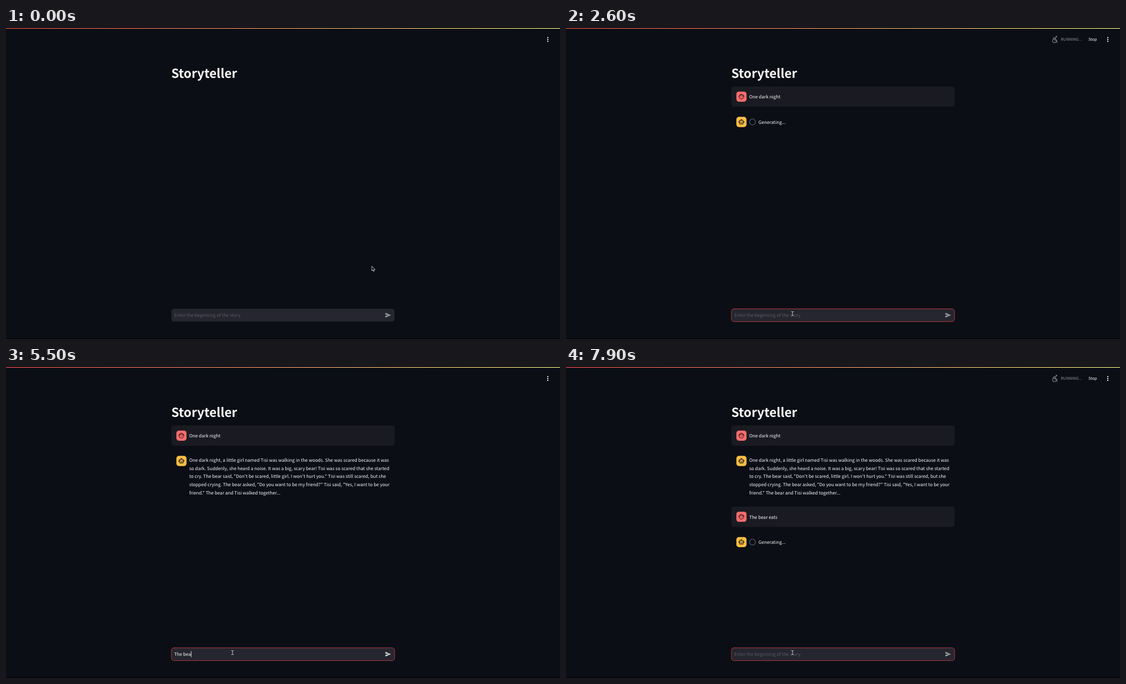
These frames come from a looping animation (998x561 px, 8 s). An HTML page with a canvas:

```html
<!DOCTYPE html>
<html lang="en">
<head>
<meta charset="utf-8">
<title>Storyteller</title>
<style>
  html, body { margin: 0; width: 100%; height: 100%; overflow: hidden; background: #0b0e15; }
  canvas { display: block; width: 998px; height: 561px; }
</style>
</head>
<body>
<canvas id="stage" width="998" height="561"></canvas>
<script>
const ctx = document.getElementById('stage').getContext('2d');
const LOOP = 8000, STEP = 100;
const FONT = '"Source Sans Pro", "Noto Sans CJK JP", "Noto Sans CJK SC", "Noto Sans CJK KR", "Noto Sans CJK", sans-serif';
const BG = '#0b0e15', INK = '#fafafa', GREY = '#84858b', FIELD = '#25262f';
const BODY = 8.175, SMALL = 7.15, TITLE = 22.5, LINE = 14.6, ICON = 0.476;
const PROMPTS = ['One dark night', 'The bear eats'];
const HINT = 'Enter the beginning of the story';
const STORY = [
  'One dark night, a little girl named Tisi was walking in the woods. She was scared because it was',
  'so dark. Suddenly, she heard a noise. It was a big, scary bear! Tisi was so scared that she started',
  'to cry. The bear said, "Don\'t be scared, little girl. I won\'t hurt you." Tisi was still scared, but she',
  'stopped crying. The bear asked, "Do you want to be my friend?" Tisi said, "Yes, I want to be your',
  'friend." The bear and Tisi walked together...'
];
const AT = {
  focus: 400, sent: 1000, waiting: 1200, running: 1400, answer: 4200, idle: 4300,
  sentAgain: 6000, waitingAgain: 6500, runningAgain: 6600
};
// Spans in which the screen stands still.
const HOLDS = [[2700, 2900], [3400, 3800], [4500, 4700], [6000, 6200], [7500, 7700], [7700, 7900]];
const within = (t, a, b) => t >= a && t < b;

function text(str, x, y, size = BODY, color = INK, weight = 400) {
  ctx.font = `${weight} ${size}px ${FONT}`;
  ctx.fillStyle = color;
  ctx.fillText(str, x, y);
  return ctx.measureText(str).width;
}

function box(x, y, w, h, r, fill, stroke, line = 0.8) {
  ctx.beginPath();
  ctx.roundRect(x, y, w, h, r);
  if (fill) { ctx.fillStyle = fill; ctx.fill(); }
  if (stroke) { ctx.strokeStyle = stroke; ctx.lineWidth = line; ctx.stroke(); }
}

function dot(x, y, r, color, from = 0, to = Math.PI * 2) {
  ctx.fillStyle = color;
  ctx.beginPath();
  ctx.arc(x, y, r, from, to);
  ctx.fill();
}

function ring(x, y, r, color, width, from = 0, to = Math.PI * 2) {
  ctx.strokeStyle = color;
  ctx.lineWidth = width;
  ctx.beginPath();
  ctx.arc(x, y, r, from, to);
  ctx.stroke();
}

function draw(path, color, width) {
  ctx.strokeStyle = color;
  ctx.lineWidth = width;
  ctx.stroke(new Path2D(path));
}

function at(x, y, paint, scale = 1) {
  ctx.save();
  ctx.translate(x, y);
  ctx.scale(scale, scale);
  paint();
  ctx.restore();
}

// Paints an avatar tile; the icon uses a grid of 24 units centred on zero.
function avatar(y, color, icon) {
  box(306.9, y - 9.15, 18.3, 18.3, 4.6, color);
  at(316, y, icon, ICON);
}

function face() {
  ring(0, 0, 9, BG, 2);
  draw('M-8.4-.8Q-4-2.6-2.6-7.4Q1.2-1.8 8.2-2.8', BG, 2);
  dot(-3, 1, 1.3, BG);
  dot(3, 1, 1.3, BG);
}

function robot() {
  box(-7, -6, 14, 14, 1, null, BG, 2);
  dot(0, -7, 3, BG, Math.PI, 0);
  dot(-8, 0, 3, BG, Math.PI / 2, Math.PI * 1.5);
  dot(8, 0, 3, BG, -Math.PI / 2, Math.PI / 2);
  dot(-3, -0.5, 1.5, BG);
  dot(3, -0.5, 1.5, BG);
  box(-4, 3, 8, 2, 0, BG);
}

const userIcon = y => avatar(y, '#ff6c6c', face);
const botIcon = y => avatar(y, '#ffbd45', robot);

function userMessage(str, y) {
  box(298, y - 18.3, 402, 36.6, 4.6, '#1a1b22');
  userIcon(y);
  text(str, 330, y + 3.4);
}

function spinner(t, y) {
  const mid = Math.PI * 0.92 + (t - 1900) / 750 * Math.PI * 2;
  ring(336, y, 5.3, '#454750', 1.7);
  ring(336, y, 5.3, '#26415e', 1.7, mid - Math.PI / 4, mid + Math.PI / 4);
  text('Generating...', 346.8, y + 3.3);
}

const SPORTS = [
  function bike() {
    ring(-3.8, 3.2, 2.8, GREY, 0.9);
    ring(3.9, 3.2, 2.8, GREY, 0.9);
    dot(1.6, -5.2, 1.3, GREY);
    draw('M.3 3.6V.8L-2.2-1L.7-3.3L2.5-1.1H4.8', GREY, 1.2);
  },
  function runner() {
    dot(1.6, -5.2, 1.3, GREY);
    draw('M-3.4-.6L-2-2.8L1-3L-.4 1L1.8 3V6.3M-.2 1.2L-1.2 3.7L-4.4 4M1-2.6L2.4-.4H4.4', GREY, 1.2);
  },
  function wheelchair() {
    dot(3.4, -4.9, 1.4, GREY);
    ring(-0.2, 2.7, 3.3, GREY, 1.1, 0.1, 4.5);
    draw('M-2.6-.2L-1.2-2.8L2-2.8L.4 1H3.6L4.6 5.6', GREY, 1.3);
  },
  function swimmer() {
    dot(4, -1.6, 1.4, GREY);
    draw('M-5 2L-.8-.8L-2.6-3L1.6-4M-.8-.8L2 1.8', GREY, 1.3);
    draw('M-6.4 3.6Q-4.8 2.2-3.2 3.6T0 3.6T3.2 3.6T6.4 3.6M-6.4 6Q-4.8 4.6-3.2 6T0 6T3.2 6T6.4 6', GREY, 0.9);
  },
  function rower() {
    dot(0.4, -4.4, 1.3, GREY);
    draw('M-.4-2.6L-1.6 1.6H2.4M-.4-2L3-.2M4.6-2L-3 5.4M-6 2.8H6', GREY, 1.1);
  }
];

function status(t, since, first) {
  const i = (first + Math.floor((t - since) / 300)) % SPORTS.length;
  at(880, 20.5, SPORTS[i]);
  text('RUNNING...', 891.5, 22.9, SMALL, '#929399');
  text('Stop', 941, 23.4, SMALL);
}

function typed(t) {
  if (t < AT.sent) return PROMPTS[0].slice(0, Math.max(0, Math.round((t - AT.focus) / 500 * 14)));
  if (!within(t, 4700, AT.sentAgain)) return '';
  const count = t <= 5500 ? 1 + Math.floor((t - 4700) / 125) : 7 + Math.ceil((t - 5500) / 75);
  return PROMPTS[1].slice(0, count);
}

function caretOn(t, value) {
  if (t < AT.focus) return false;
  if (value || t < AT.sent) return true;
  const phase = t % 1000;
  return t < 5900 ? phase > 900 || phase < 400 : phase > 400 && phase < 900;
}

function inputBar(t) {
  const focused = t >= AT.focus, value = typed(t);
  box(298, 506.6, 402, 23, 4.6, FIELD, focused ? '#f04a4d' : null, 0.7);
  let end = 302.9;
  if (value) end += text(value, 302.9, 521.3);
  else text(HINT, 302.9, 521.3, BODY, '#5a5b63');
  if (caretOn(t, value)) {
    ctx.fillStyle = INK;
    ctx.fillRect(end + 0.2, 512.5, 0.8, 11);
  }
  at(682.6, 512.3, () => {
    ctx.fillStyle = value ? '#d5d5d8' : '#a3a4a9';
    ctx.fill(new Path2D('M2 21L23 12L2 3V10L17 12L2 14Z'));
  }, ICON);
}

function pointer(t) {
  const k = Math.min(1, t / 400), ease = k * k * (3 - 2 * k);
  const x = 659 - 251 * ease, y = 430 + 85.2 * ease;
  at(x, y, () => {
    if (y > 506) {
      const beam = 'M-2-3.8Q0-3.8 0-2.8Q0-3.8 2-3.8M0-3V3M-2 3.8Q0 3.8 0 2.8Q0 3.8 2 3.8';
      draw(beam, '#14161d', 2.6);
      draw(beam, '#f0f0f0', 0.9);
    } else {
      const arrow = new Path2D('M0 0V8L1.9 6.3L3.2 9.1L4.5 8.5L3.2 5.8H5.6Z');
      ctx.fillStyle = '#08090d';
      ctx.fill(arrow);
      ctx.strokeStyle = '#e6e6e6';
      ctx.lineWidth = 0.8;
      ctx.stroke(arrow);
    }
  });
}

function chrome() {
  ctx.fillStyle = BG;
  ctx.fillRect(0, 0, 998, 561);
  const glow = ctx.createLinearGradient(0, 0, 998, 0);
  glow.addColorStop(0, '#ff4b4b');
  glow.addColorStop(1, '#fffd80');
  ctx.fillStyle = glow;
  ctx.fillRect(0, 0, 998, 1.15);
  ctx.fillStyle = '#000';
  ctx.fillRect(0, 560, 998, 1);
  for (const y of [17.4, 20.8, 24.2]) dot(976, y, 1.13, INK);
  text('Storyteller', 297.7, 90.2, TITLE, INK, 700);
}

function render(t) {
  chrome();
  if (t >= AT.sent) {
    userMessage(PROMPTS[0], 123.8);
    botIcon(169.5);
  }
  if (within(t, AT.waiting, AT.answer)) spinner(t, 169.5);
  if (t >= AT.answer) STORY.forEach((line, i) => text(line, 330, 171.1 + LINE * i));
  if (t >= AT.sentAgain) {
    userMessage(PROMPTS[1], 270.1);
    botIcon(315.8);
  }
  if (t >= AT.waitingAgain) spinner(t, 315.8);
  if (within(t, AT.running, AT.idle)) status(t, 400, 0);
  if (t >= AT.runningAgain) status(t, AT.runningAgain, 3);
  inputBar(t);
  pointer(t);
}

function screenTime(now) {
  const t = Math.floor((now % LOOP) / STEP) * STEP;
  const hold = HOLDS.find(([a, b]) => within(t, a, b));
  return hold ? hold[0] : t;
}

ctx.textRendering = 'geometricPrecision';
ctx.lineCap = ctx.lineJoin = 'round';
const start = performance.now();
function tick() {
  render(screenTime(performance.now() - start));
  requestAnimationFrame(tick);
}
tick();
</script>
</body>
</html>
```
